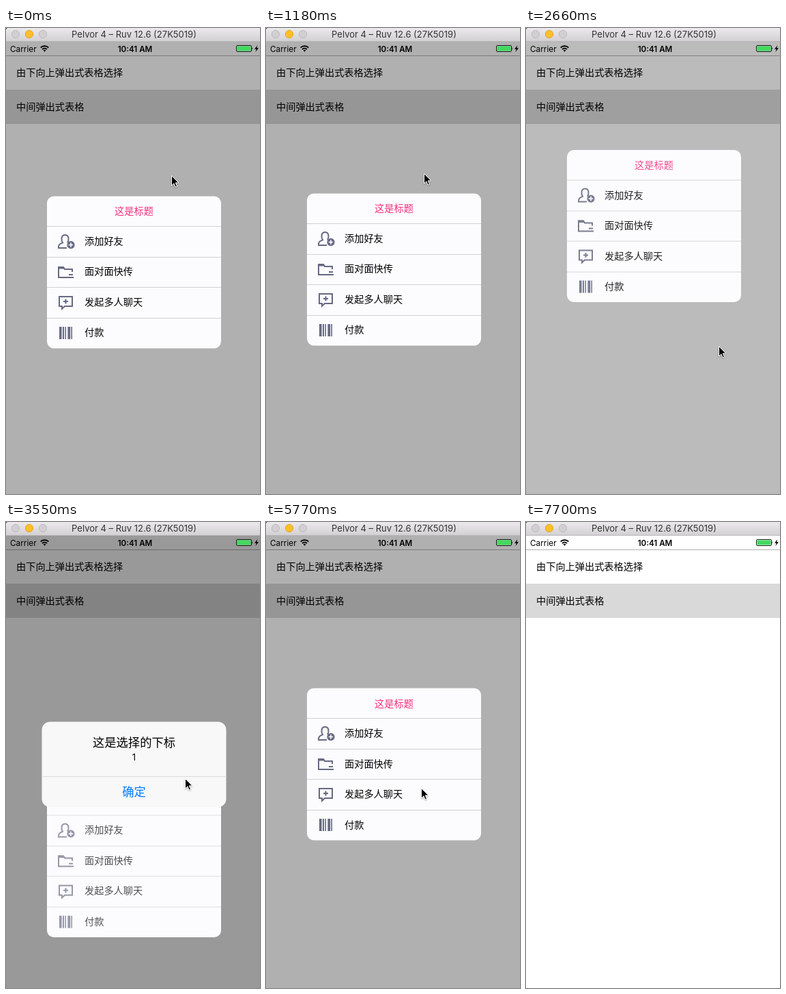
Write an HTML page that moves like this. It is 372 by 680 pixels and loops after 7.8 s.

```html
<!DOCTYPE html>
<html lang="zh-CN">
<head>
<meta charset="utf-8">
<title>弹出式表格</title>
<style>
  html, body { margin: 0; width: 100%; height: 100%; overflow: hidden; background: #fff; }
  svg { display: block; width: 372px; height: 680px; }
  text { font: 14.2px "Noto Sans CJK SC", "Noto Sans CJK", sans-serif; fill: #000; }
  .latin { font-family: Inter, Roboto, sans-serif; }
  .mid { text-anchor: middle; }
  .big { font-size: 17.3px; font-weight: 500; }
  .icon { fill: none; stroke: #676982; stroke-width: 2; }
  .solid { fill: #676982; stroke: none; }
</style>
</head>
<body>
<svg viewBox="0 0 372 680">
  <defs>
    <linearGradient id="bar" x2="0" y2="1">
      <stop stop-color="#ebe9eb"/><stop offset="1" stop-color="#d2d0d2"/>
    </linearGradient>
    <filter id="shade" x="-50%" y="-50%" width="200%" height="200%">
      <feDropShadow dx="0" dy="1" stdDeviation="1" flood-opacity=".35"/>
    </filter>
  </defs>

  <rect width="372" height="680" fill="#fff"/>
  <path d="M0 40.5H372" stroke="#b2b2b2"/>
  <rect y="90" width="372" height="50" fill="#d9d9d9"/>
  <text x="15" y="70.3">由下向上弹出式表格选择</text>
  <text x="15" y="120.3">中间弹出式表格</text>

  <rect id="dim" y="20" width="372" height="660"/>

  <g id="popup">
    <rect width="255" height="222" rx="10" fill="#fcfcfe"/>
    <g id="content">
      <text class="mid" x="127.5" y="27" style="fill:#f5317f">这是标题</text>
      <g id="rows"></g>
      <g class="icon" transform="translate(0 44.5)">
        <path d="M29 31H17C16.5 26 19 25 23 23.3C20.5 19.5 20.5 12 26.5 12C32.5 12 32.5 19.5 30 23.3"/>
        <circle class="solid" cx="35" cy="26.5" r="5.6"/>
        <path d="M31.8 26.5h6.4M35 23.3v6.4" stroke="#fff" stroke-width="1.6"/>
      </g>
      <g class="icon" transform="translate(0 88.5)">
        <path d="M37 22V18H26L24 15H17V30H39"/>
        <path class="solid" d="M16 14h8.5l2 3.5H16zM32 25h6v2h-6z"/>
      </g>
      <g class="icon" transform="translate(0 132.5)">
        <path d="M18 14H37V28H26L22 31.8V28H18Z"/>
        <path d="M24 21h7M27.5 17.5v7"/>
      </g>
      <path class="solid" transform="translate(0 177.5)"
        d="M18 13h3.6v18H18zM23 13h2v18h-2zM26.4 13h1.6v18h-1.6zM30.4 13h3.8v18h-3.8zM35.4 13h1.6v18h-1.6z"/>
    </g>
  </g>

  <g id="alert">
    <rect x="52.5" y="291.5" width="270" height="124.5" rx="12" fill="#f8f8f8"/>
    <path d="M52.5 371.5h270" stroke="#dcdce0"/>
    <text class="mid big" x="187.5" y="327.5">这是选择的下标</text>
    <text class="mid latin" id="choice" x="187.5" y="347.5" style="font-size:13px"></text>
    <text class="mid big" x="187.5" y="400" style="fill:#007aff">确定</text>
  </g>

  <text class="latin" x="6" y="34.5" style="font-size:11.8px">Carrier</text>
  <text class="latin mid" x="189" y="34.5" style="font-size:11.6px;font-weight:600">10:41 AM</text>
  <g fill="none" stroke="#000" stroke-width="1.9">
    <path d="M50.7 28.7a8.2 8.2 0 0 1 11.6 0M53 31.1a5 5 0 0 1 7 0"/>
    <path d="M56.5 34.8l-2-2.2a3 3 0 0 1 4 0z" fill="#000" stroke="none"/>
  </g>
  <rect x="337.5" y="25.5" width="22" height="9" rx="1.5" fill="none" stroke="#222"/>
  <rect x="338.5" y="26.5" width="20" height="7" fill="#43da60"/>
  <path d="M360.5 28.3q1.7 1.7 0 3.4z"/>
  <path d="M368.3 25.3L364 30.7h2.7L365.3 35l4.7-5.8h-2.8z"/>

  <rect width="372" height="19.5" fill="url(#bar)"/>
  <path d="M0 19.5H372" stroke="#bab8ba"/>
  <path d="M0 0h2L0 2z" fill="#555"/>
  <circle cx="14" cy="9" r="5.6" fill="#d1cfd1" stroke="#bdbbbd"/>
  <circle cx="34" cy="9" r="5.6" fill="#ffbf2a" stroke="#e2a51f"/>
  <circle cx="54" cy="9" r="5.6" fill="#d1cfd1" stroke="#bdbbbd"/>
  <text class="latin mid" x="187.5" y="14" style="font-size:13px;fill:#333">Pelvor 4 – Ruv 12.6 (27K5019)</text>

  <path id="cursor" d="M.5 .5V15L3.9 11.8L6.1 17L8.5 16L6.3 10.9H11Z"
    fill="#000" stroke="#fff" filter="url(#shade)"/>
</svg>
<script>
const LOOP = 7800, TICK = 148.08;
const ABOVE = -222, REST = 242.5, BELOW = 680;
const SLIDE = 370, ALERT_IN = 220, ALERT_OUT = 450, PAUSE = 140;

// A visit ends with a tap outside, or with a choice confirmed in an alert
const visits = [
  { enter: -1000, leave: -70 },
  { enter: 863, leave: 1700 },
  { enter: 2487, leave: 3300, confirm: 4287, choice: 1 },
  { enter: 5100, leave: 6000, confirm: 6880, choice: 2 }
];

// Pointer stops: the time of arrival and the place
const stops = [
  [0, 242, 215], [590, 205, 118], [1180, 231, 212], [1900, 210, 118],
  [2660, 282, 464], [3110, 262, 364], [3550, 262, 374], [3700, 205, 394],
  [4585, 197, 163], [4900, 196, 118], [5770, 227, 388], [6800, 218, 394],
  [7400, 362, 675], [7690, 362, 700]
];

const $ = id => document.getElementById(id);
const clamp = v => Math.min(1, Math.max(0, v));
const mix = (a, b, p) => a + (b - a) * p;
const easeIn = p => p ** 3;
const easeOut = p => 1 - (1 - p) ** 3;
const smooth = p => p * p * (3 - 2 * p);

$('rows').innerHTML = ['添加好友', '面对面快传', '发起多人聊天', '付款'].map((label, i) =>
  `<path d="M0 ${Math.round(44.1 + i * 44.5)}H255" stroke="#d0d0d5"/>
   <text x="55" y="${70.5 + i * 44.5}">${label}</text>`).join('');

function popupPose({ enter, leave }, t) {
  const arrived = easeOut(clamp((t - enter) / SLIDE));
  const left = easeIn(clamp((t - leave) / SLIDE));
  return { y: mix(ABOVE, REST, arrived) + (BELOW - REST) * left, shown: arrived * (1 - left) };
}

function alertOpacity({ leave, confirm }, t) {
  if (!confirm) return 0;
  return easeOut(clamp((t - leave) / ALERT_IN)) * (1 - easeOut(clamp((t - confirm) / ALERT_OUT)));
}

function pointer(t) {
  const next = stops.findIndex(s => s[0] > t);
  if (next < 0) return stops.at(-1).slice(1);
  const [from, x, y] = stops[next - 1], [to, x2, y2] = stops[next];
  const p = smooth(clamp((t - from - PAUSE) / (to - from - PAUSE)));
  return [mix(x, x2, p), mix(y, y2, p)];
}

function draw(ms) {
  const t = Math.floor((ms + 14) / TICK) * TICK;
  const visit = visits.findLast(v => v.enter <= t);
  const { y, shown } = popupPose(visit, t);
  const alertShown = alertOpacity(visit, t);
  $('popup').setAttribute('transform', `translate(60 ${y})`);
  $('content').setAttribute('opacity', shown);
  $('alert').setAttribute('opacity', alertShown);
  $('choice').textContent = visit.choice ?? '';
  $('dim').setAttribute('opacity', Math.max(.31 * shown, .4 * alertShown));
  $('cursor').setAttribute('transform', `translate(${pointer(t)})`);
}

const start = performance.now();
function frame() {
  draw((performance.now() - start) % LOOP);
  requestAnimationFrame(frame);
}
frame();
</script>
</body>
</html>
```
